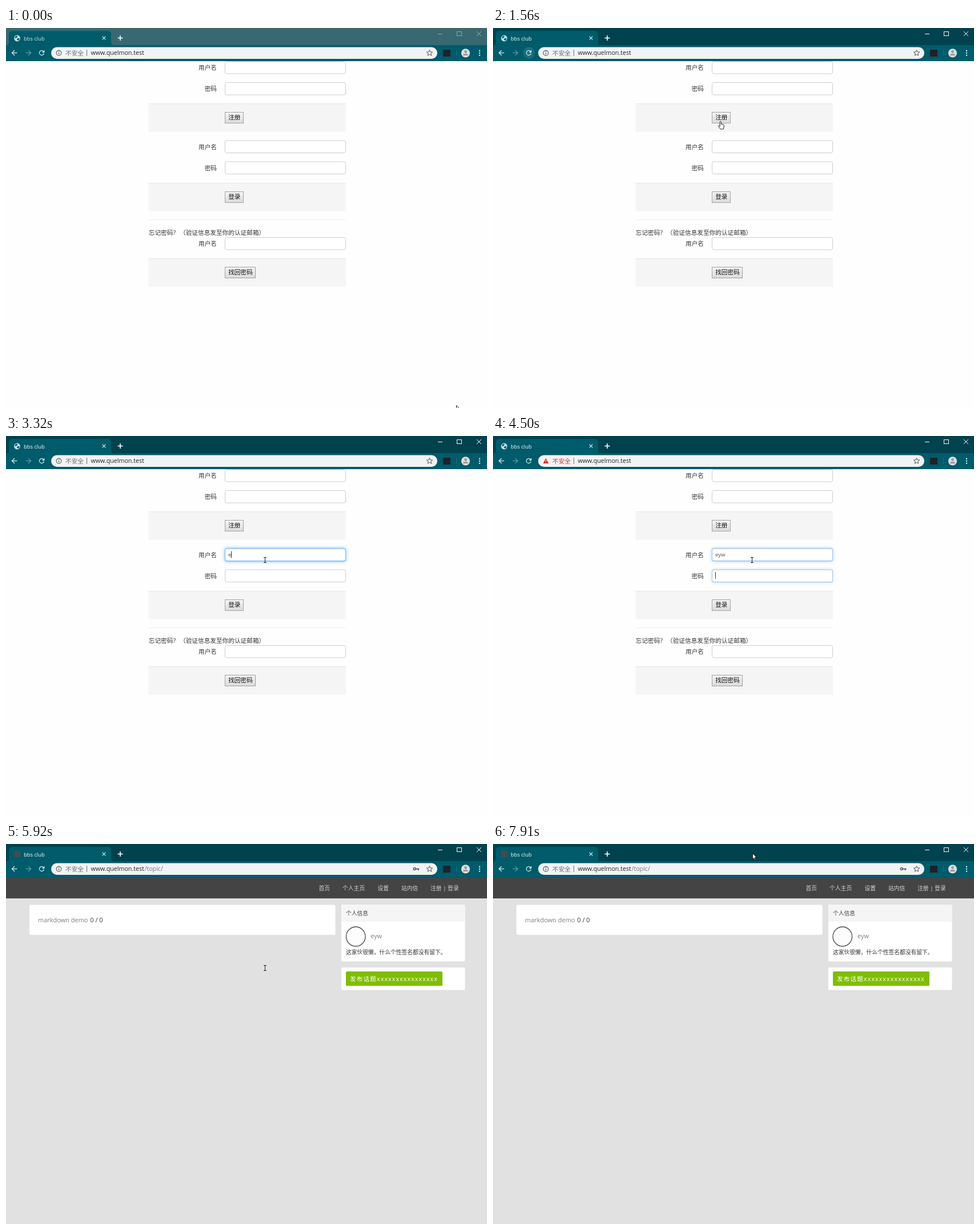
Recreate the animation shown at these times as an HTML page with a canvas. Size 842x665 px, loop 8000 ms.

```html
<!DOCTYPE html>
<html lang="zh-CN">
<head>
<meta charset="utf-8">
<title>bbs club</title>
<style>
html, body { margin: 0; width: 100%; height: 100%; overflow: hidden; background: #fefefe; }
canvas { display: block; }
</style>
</head>
<body>
<canvas id="stage" width="842" height="665"></canvas>
<script>
const ctx = document.getElementById('stage').getContext('2d');
const LOOP = 8000, TICK = 111.5, TICK_START = 94;
const FAMILY = '"Open Sans", "Noto Sans CJK SC", "Noto Sans CJK", sans-serif';
const USER = 'eyw', HOST = 'www.quelmon.test';
const T = {
  hover: 760, active: 1000, hoverEnd: 1670, focusUser: 1870,
  typed: [3320, 3740, 3950], warn: 3400, focusPass: 4500,
  dots: [5060, 5370, 5600], key: 5160, submit: 5800, topic: 5920
};

// Pointer stops: time, x, y
const PATH = [
  [0, 788, 660], [200, 700, 575], [540, 310, 240], [880, 61, 41],
  [1230, 61, 41], [1380, 190, 92], [1540, 398, 162], [1780, 430, 200],
  [2090, 445, 222], [2420, 453, 217], [6680, 453, 217], [7005, 428, 204],
  [7240, 398, 238], [7450, 383, 274], [7570, 391, 278], [7680, 391, 280],
  [7790, 425, 150], [7890, 454, 16]
];

const clamp = v => Math.max(0, Math.min(1, v));
const shown = (times, t) => times.filter(s => t >= s).length;

function text(s, x, y, size, color, spacing = 0) {
  ctx.font = `${size}px ${FAMILY}`;
  ctx.letterSpacing = spacing + 'px';
  ctx.fillStyle = color;
  ctx.fillText(s, x, y);
}

function rect(x, y, w, h, color) {
  ctx.fillStyle = color;
  ctx.fillRect(x, y, w, h);
}

function round(x, y, w, h, r, fill, stroke) {
  ctx.beginPath();
  ctx.roundRect(x, y, w, h, r);
  if (fill) { ctx.fillStyle = fill; ctx.fill(); }
  if (stroke) { ctx.strokeStyle = stroke; ctx.lineWidth = 1; ctx.stroke(); }
}

function circle(x, y, r, fill, stroke, width = 1) {
  ctx.beginPath();
  ctx.arc(x, y, r, 0, Math.PI * 2);
  if (fill) { ctx.fillStyle = fill; ctx.fill(); }
  if (stroke) { ctx.strokeStyle = stroke; ctx.lineWidth = width; ctx.stroke(); }
}

function trace(points, closed) {
  ctx.beginPath();
  points.forEach(([x, y]) => ctx.lineTo(x, y));
  if (closed) ctx.closePath();
}

function line(points, color, width = 1) {
  trace(points);
  ctx.strokeStyle = color;
  ctx.lineWidth = width;
  ctx.stroke();
}

function cross(x, y, r, color, width) {
  line([[x - r, y - r], [x + r, y + r]], color, width);
  line([[x - r, y + r], [x + r, y - r]], color, width);
}

function arrowIcon(x, y, dir, color) {
  line([[x - 4.5 * dir, y], [x + 4.5 * dir, y]], color, 1.3);
  line([[x, y - 4.5], [x + 4.5 * dir, y], [x, y + 4.5]], color, 1.3);
}

function reloadIcon(x, y, color) {
  ctx.beginPath();
  ctx.arc(x, y, 4, 0.25, Math.PI * 1.75);
  ctx.strokeStyle = color;
  ctx.lineWidth = 1.3;
  ctx.stroke();
  trace([[x + 4.8, y - 5], [x + 4.8, y - 0.6], [x + 0.4, y - 0.6]], true);
  ctx.fillStyle = color;
  ctx.fill();
}

function star(x, y, r, color) {
  const points = Array.from({ length: 10 }, (_, i) => {
    const a = i * Math.PI / 5 - Math.PI / 2, d = i % 2 ? r * 0.45 : r;
    return [x + d * Math.cos(a), y + d * Math.sin(a)];
  });
  trace(points, true);
  ctx.strokeStyle = color;
  ctx.lineWidth = 1;
  ctx.stroke();
}

function titleBar(t) {
  const active = t >= T.active;
  rect(0, 0, 842, 31, active ? '#00424e' : '#386973');
  ctx.fillStyle = '#005b6a';
  ctx.beginPath();
  ctx.moveTo(0, 31);
  ctx.quadraticCurveTo(5, 31, 5, 25);
  ctx.lineTo(5, 11);
  ctx.quadraticCurveTo(5, 5, 11, 5);
  ctx.lineTo(178, 5);
  ctx.quadraticCurveTo(184, 5, 184, 11);
  ctx.lineTo(184, 25);
  ctx.quadraticCurveTo(184, 31, 190, 31);
  ctx.fill();

  if (t >= T.topic) {
    rect(14, 12, 11, 11, '#454b4c');
  } else {
    circle(19.5, 18, 5.4, '#c3e8ee');
    ctx.fillStyle = '#0b5b69';
    trace([[16, 15], [19, 13.5], [20.5, 15.5], [18, 17.5], [15.5, 18]], true);
    ctx.fill();
    trace([[19, 19], [22.5, 17.5], [24, 19], [21.5, 22], [19.5, 21]], true);
    ctx.fill();
  }
  text('bbs club', 31, 21.5, 9.4, active ? '#fff' : '#d5e5e8');
  cross(171.5, 17.5, 2.8, '#e4f0f2', 1.2);
  line([[195.5, 17.5], [204.5, 17.5]], '#fff', 1.6);
  line([[200, 13], [200, 22]], '#fff', 1.6);

  const control = active ? '#f4f8f9' : '#8aa5ab';
  line([[756, 10.5], [764, 10.5]], control);
  ctx.strokeRect(789.5, 6.5, 8, 7);
  cross(828, 10, 4, control, 1);
}

function toolbar(t) {
  rect(0, 30, 842, 28, '#005b6a');
  const icon = '#d3f0f4';
  if (t >= T.hover && t < T.hoverEnd) circle(63, 43.5, 10.3, '#1c6d7a');
  arrowIcon(15, 43.5, -1, icon);
  arrowIcon(39, 43.5, 1, '#5a98a2');
  reloadIcon(62.5, 43.5, icon);
  round(79, 33.5, 676, 20.5, 10.25, '#f1f3f4');

  const warn = t >= T.warn && t < T.topic;
  if (warn) {
    trace([[92.5, 39], [97.3, 48], [87.7, 48]], true);
    ctx.fillStyle = '#d0281e';
    ctx.fill();
    rect(92, 42, 1, 3, '#fff');
    rect(92, 46, 1, 1, '#fff');
  } else {
    circle(92.5, 43.8, 4.4, null, '#4e5256', 1.1);
    rect(92, 43, 1.1, 3.4, '#4e5256');
    rect(92, 41, 1.1, 1.1, '#4e5256');
  }
  text('不安全', 104, 47.7, 10.67, warn ? '#d0382f' : '#696d71');
  rect(141, 38, 1, 11, '#6c7073');
  text(HOST, 148.5, 47.4, 10.67, '#202124');
  if (t >= T.topic) text('/topic/', 242.5, 47.4, 10.67, '#74787c');

  if (t >= T.key) {
    circle(715.3, 43.5, 2, null, '#53575b', 1.6);
    rect(717.5, 42.7, 6, 1.7, '#53575b');
    rect(720.8, 43.5, 1.8, 2.7, '#53575b');
  }
  star(741.5, 43.8, 5.4, '#4e5256');
  rect(765, 38, 13, 12, '#202128');
  rect(788, 38, 1, 11, '#21707c');
  circle(804.5, 43.8, 7.6, '#dedfe0');
  circle(804.5, 41.4, 2.4, '#95999b');
  ctx.beginPath();
  ctx.ellipse(804.5, 48, 4.6, 2.9, 0, Math.PI, 0);
  ctx.fillStyle = '#95999b';
  ctx.fill();
  [39.8, 43.8, 47.8].forEach(y => circle(829, y, 1.2, icon));
}

function field(label, y, focus = 0) {
  text(label, 369 - label.length * 10.67, y + 15, 10.67, '#333');
  if (focus) {
    ctx.save();
    ctx.globalAlpha = focus;
    ctx.shadowColor = 'rgba(82,168,236,.75)';
    ctx.shadowBlur = 6;
    round(383, y, 212, 23, 3, '#8cc5f2');
    ctx.restore();
  }
  round(383.5, y + 0.5, 211, 21.5, 3, '#fff', '#ccc');
  if (focus) {
    ctx.globalAlpha = focus;
    round(383.5, y + 0.5, 211, 21.5, 3, null, '#78b9ee');
    ctx.globalAlpha = 1;
  }
}

function actions(label, y) {
  rect(249.5, y, 345.5, 49.5, '#f5f5f5');
  rect(249.5, y, 345.5, 1, '#e6e6e6');
  const shade = ctx.createLinearGradient(0, y + 15, 0, y + 35);
  shade.addColorStop(0, '#f5f5f5');
  shade.addColorStop(1, '#dadada');
  ctx.fillStyle = shade;
  const w = 11.5 + label.length * 10.67;
  ctx.fillRect(383, y + 15, w, 20);
  ctx.strokeStyle = '#a2a2a2';
  ctx.lineWidth = 1;
  ctx.strokeRect(383.5, y + 15.5, Math.round(w) - 1, 19);
  text(label, 389.2, y + 28.2, 10.67, '#111');
}

function caret(x, y) {
  rect(x, y, 1, 12, '#333');
}

function loginPage(t) {
  rect(0, 58, 842, 607, '#fefefe');
  const passFocus = clamp((t - T.focusPass + 60) / 160);
  const userFocus = clamp((t - T.focusUser) / 160) * (1 - passFocus);
  field('用户名', 58);
  field('密码', 95);
  actions('注册', 132);
  field('用户名', 196.5, userFocus);
  field('密码', 233.5, passFocus);
  actions('登录', 271);
  rect(249.5, 335, 345.5, 1, '#eee');
  text('忘记密码?', 249.8, 362.3, 10.67, '#333');
  text('（验证信息发至你的认证邮箱）', 304, 362.3, 10.67, '#333');
  field('用户名', 366);
  actions('找回密码', 403);

  const typed = USER.slice(0, shown(T.typed, t));
  text(typed, 389, 211, 9.6, '#555');
  const typedWidth = ctx.measureText(typed).width;
  const dots = shown(T.dots, t);
  for (let i = 0; i < dots; i++) circle(390.8 + i * 3.5, 244.5, 1.5, '#555');

  const blinkOff = t >= 2430 && t < 2980;
  if (t >= T.focusPass) caret(Math.round(389 + dots * 3.4), 238);
  else if (t >= T.focusUser && !blinkOff) caret(Math.round(389 + typedWidth), 201.5);
}

function topicPage(t) {
  rect(0, 58, 842, 607, '#e1e1e1');
  rect(0, 58, 842, 37.5, '#444');
  rect(0, 95.5, 842, 1, '#ececec');
  const links = [['首页', 547.5], ['个人主页', 589], ['设置', 650.5], ['站内信', 692], ['注册 | 登录', 743]];
  links.forEach(([s, x]) => text(s, x, 80.6, 9.8, '#d2d2d2'));

  round(41, 106.5, 535.5, 52.5, 2, '#fff');
  text('markdown demo', 56, 137.3, 11, '#778087');
  text('0 / 0', 147.3, 136.7, 11, '#333');

  round(587, 106, 216.5, 99.5, 2, '#fff');
  round(587, 106, 216.5, 30, [2, 2, 0, 0], '#f5f5f5');
  text('个人信息', 595, 125.2, 9.75, '#444');
  const sway = Math.sin((t - T.topic) / 110);
  ctx.beginPath();
  ctx.ellipse(612.3 + 0.8 * sway, 162, 16.8, 17, 0, 0, Math.PI * 2);
  ctx.fillStyle = '#fdfdfd';
  ctx.fill();
  ctx.strokeStyle = '#4a4a4a';
  ctx.lineWidth = 1.3;
  ctx.stroke();
  text(USER, 638, 165, 11, '#778087');
  text('这家伙很懒，什么个性签名都没有留下。', 595, 192.7, 9.75, '#333');

  round(587, 216, 216.5, 39.5, 2, '#fff');
  round(595, 223, 169, 25.3, 2, '#80bd01');
  text('发布话题' + 'x'.repeat(16), 602, 240, 10.67, '#fff', 1.1);
}

function pointerAt(t) {
  const i = PATH.findIndex(p => p[0] > t);
  if (i < 0) return PATH[PATH.length - 1].slice(1);
  const [t0, x0, y0] = PATH[i - 1], [t1, x1, y1] = PATH[i];
  const k = (t - t0) / (t1 - t0);
  return [x0 + (x1 - x0) * k, y0 + (y1 - y0) * k].map(Math.round);
}

function arrowPointer() {
  trace([[0.5, 0.5], [0.5, 10.5], [2.8, 8.4], [4.3, 11.8], [5.8, 11.1], [4.4, 7.8], [7.3, 7.4]], true);
  ctx.fillStyle = '#fff';
  ctx.fill();
  ctx.strokeStyle = '#111';
  ctx.lineWidth = 0.9;
  ctx.stroke();
}

function handPointer() {
  ctx.beginPath();
  ctx.moveTo(-0.8, 9);
  ctx.lineTo(-0.8, 1.2);
  ctx.quadraticCurveTo(0.3, -0.6, 1.4, 1.2);
  ctx.lineTo(1.4, 5);
  ctx.lineTo(5, 5.8);
  ctx.quadraticCurveTo(6.6, 6.4, 6.4, 8.5);
  ctx.lineTo(5.2, 14);
  ctx.lineTo(0.2, 14);
  ctx.lineTo(-3.6, 8.6);
  ctx.quadraticCurveTo(-3, 6.6, -0.8, 9);
  ctx.closePath();
  ctx.fillStyle = '#fff';
  ctx.fill();
  ctx.strokeStyle = '#222';
  ctx.lineWidth = 1;
  ctx.stroke();
}

function beamPointer() {
  rect(0, -5, 1, 10, '#222');
  rect(-2, -5, 5, 1, '#222');
  rect(-2, 4, 5, 1, '#222');
}

function pointer(t) {
  const tick = Math.floor((t - TICK_START) / TICK);
  const held = Math.max(0, TICK_START + tick * TICK);
  const [x, y] = pointerAt(held);
  const onButton = held > 1450 && x > 383 && x < 416 && y > 147 && y < 167;
  const beam = held > 1700 && held < 6690 && !(t >= T.submit && t < T.topic);
  ctx.save();
  ctx.translate(x, y);
  if (onButton) handPointer();
  else if (beam) beamPointer();
  else arrowPointer();
  ctx.restore();
}

function draw(now) {
  const t = now % LOOP;
  if (t < T.topic) loginPage(t);
  else topicPage(t);
  titleBar(t);
  toolbar(t);
  pointer(t);
}

const start = performance.now();
function loop() {
  draw(performance.now() - start);
  requestAnimationFrame(loop);
}
loop();
</script>
</body>
</html>
```
